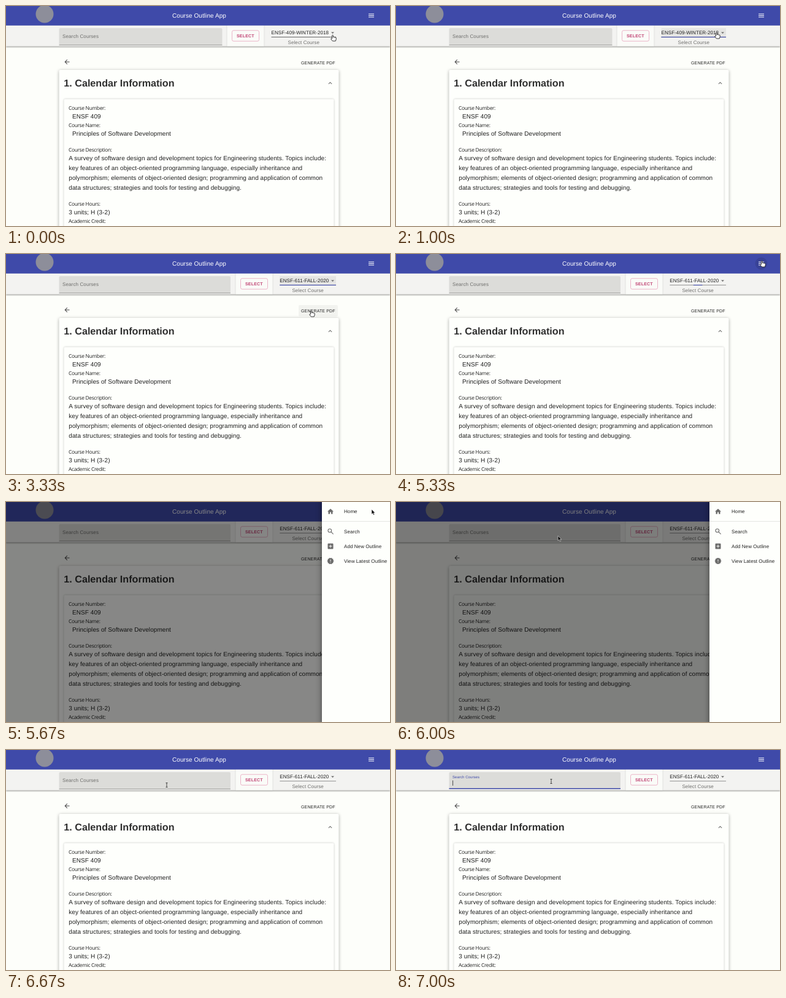
An HTML page for the animation above (8 s loop, 626 px wide and 358 px high).

```html
<!DOCTYPE html>
<html lang="en">
<head>
<meta charset="utf-8">
<title>Course Outline App</title>
<style>
  html, body { margin: 0; width: 100%; height: 100%; overflow: hidden; background: #fdfefa; }
  svg { display: block; width: 626px; height: 358px; }
  text { font-family: "Liberation Sans", Arial, sans-serif; fill: #212121; white-space: pre; text-rendering: geometricPrecision; }
  .body { font-size: 10px; letter-spacing: .075px; }
  .label { font: 500 8.4px "Open Sans", "Noto Sans", sans-serif; letter-spacing: -.32px; }
  .small { font-size: 8px; letter-spacing: .075px; }
  .button { font-size: 7px; letter-spacing: .15px; }
  .hint { fill: #6f6f6d; }
  .icon { fill: #6b6b6a; }
  .bar { filter: drop-shadow(0 1px 1.2px rgba(0,0,0,.45)); }
  .card { fill: #fefffc; filter: drop-shadow(0 1px 2.4px rgba(0,0,0,.34)); }
  .inner { fill: #fefffc; filter: drop-shadow(0 .5px 1.5px rgba(0,0,0,.24)); }
  .panel { filter: drop-shadow(0 .5px .8px rgba(0,0,0,.16)); }
  .popup { fill: #fefffc; filter: drop-shadow(0 2px 2.5px rgba(0,0,0,.4)); }
  .sheet { fill: #fefffc; filter: drop-shadow(-1px 0 4px rgba(0,0,0,.4)); }
</style>
</head>
<body>
<svg id="stage" viewBox="0 0 626 358" xmlns="http://www.w3.org/2000/svg"></svg>
<script>
const stage = document.getElementById("stage");
const LOOP = 8000;
const BLUE = "#3f4aa9";

const text = (x, y, cls, str, extra = "") =>
  `<text x="${x}" y="${y}" class="${cls}" ${extra}>${str}</text>`;
const rect = (x, y, w, h, fill, extra = "") =>
  `<rect x="${x}" y="${y}" width="${w}" height="${h}" fill="${fill}" ${extra}/>`;
// 24-unit icons drawn at half size, centred on x, y
const icon = (x, y, d, extra = 'class="icon"') =>
  `<path transform="translate(${x - 6} ${y - 6}) scale(.5)" d="${d}" ${extra}/>`;

const ICONS = {
  menu: "M3 18h18v-2H3zM3 13h18v-2H3zM3 6v2h18V6z",
  back: "M20 11H7.83l5.59-5.59L12 4l-8 8 8 8 1.41-1.41L7.83 13H20z",
  less: "M12 8l-6 6 1.41 1.41L12 10.83l4.59 4.58L18 14z",
  drop: "M7 10l5 5 5-5z",
  home: "M10 20v-6h4v6h5v-8h3L12 3 2 12h3v8z",
  add: "M19 3H5a2 2 0 0 0-2 2v14a2 2 0 0 0 2 2h14a2 2 0 0 0 2-2V5a2 2 0 0 0-2-2zm-2 10h-4v4h-2v-4H7v-2h4V7h2v4h4z",
  latest: "M23 12l-2.4-2.8.3-3.7-3.6-.8-1.9-3.2L12 3 8.6 1.5 6.7 4.7l-3.6.8.3 3.7L1 12l2.4 2.8-.3 3.7 3.6.8 1.9 3.2L12 21l3.4 1.5 1.9-3.2 3.6-.8-.3-3.7zm-10 5h-2v-2h2zm0-4h-2V7h2z"
};

const COURSES = ["ENSF-409-WINTER-2018", "ENSF-607-FALL-2020", "ENSF-619-FALL-2020", "ENSF-611-FALL-2020", "View All"];

const POINTERS = {
  hand: '<path d="M-2.4 1V-4.1Q-1.5-5.6-.6-4.1V-1.3Q.5-2 1.2-1.1 2.3-1.7 2.8-.8 4-1.2 4.2 0V2.2L3.2 5H-1.6L-4.3 1.6Q-4.2.2-2.4 1Z" fill="#fff" stroke="#222" stroke-width=".9" stroke-linejoin="round"/>',
  arrow: '<path d="M0 0V8L1.9 6.3 3.2 9.2 4.6 8.6 3.3 5.8H5.8Z" fill="#111" stroke="#fff" stroke-width=".5"/>',
  beam: '<path d="M-1.5-3.5H1.5M0-3.5V3.5M-1.5 3.5H1.5" fill="none" stroke="#333" stroke-width=".9"/>'
};

// Each step inherits whatever it does not set from the one before.
const STEPS = [
  { at: 0, ptr: "hand", x: 534, y: 52, course: 0, line: "#555", focus: 0, menu: 0, row: 0,
    pdf: 0, btn: 0, burger: 0, shade: 0, drawer: 120, typing: 0 },
  { at: 330, y: 51, line: "#333" },
  { at: 670, x: 525, y: 48 },
  { at: 1000, x: 524, focus: 1 },
  { at: 1330, x: 519, y: 46, menu: 1 },
  { at: 1670, x: 513, y: 84, row: 2 },
  { at: 2000, x: 502, y: 105, row: 3 },
  { at: 2330, x: 500, y: 97 },
  { at: 3000, course: 3, menu: .9, line: "#8b8b89" },
  { at: 3330, x: 499, menu: 0, pdf: .045 },
  { at: 3670, x: 484, y: 92 },
  { at: 4000, x: 388, y: 57, pdf: 0, btn: .04 },
  { at: 4330, x: 405, y: 54, btn: .08 },
  { at: 4670, ptr: "arrow", x: 552, y: 18, btn: .04 },
  { at: 5000, ptr: "hand", x: 597, y: 16, btn: 0, burger: .1 },
  { at: 5330, x: 598, focus: .16 },
  { at: 5670, ptr: "arrow", x: 596, y: 12, focus: 0, burger: 0, shade: .47, drawer: 4 },
  { at: 6000, x: 264, y: 55, shade: .5, drawer: 0 },
  { at: 6330, shade: .065, drawer: 75 },
  { at: 6670, ptr: "beam", x: 262, y: 57, shade: 0, drawer: 120 },
  { at: 7000, x: 253, y: 51, typing: 1 }
];
for (let i = 1; i < STEPS.length; i++) STEPS[i] = { ...STEPS[i - 1], ...STEPS[i] };

function page() {
  return rect(0, 0, 626, 358, "#fdfefa") +
    rect(86.5, 104, 456, 270, "", 'class="card" rx="2"') +
    rect(94.5, 151.5, 440, 220, "", 'class="inner" rx="2"') +
    icon(99.5, 91, ICONS.back, 'fill="#444"') +
    icon(528.5, 125.5, ICONS.less) +
    text(94.3, 131, "", "1. Calendar Information", 'font-size="16.15" font-weight="700" style="fill:#303030"') +
    text(102, 168.5, "label", "Course Number:") +
    text(108, 183, "body", "ENSF 409") +
    text(102, 196.5, "label", "Course Name:") +
    text(108, 211, "body", "Principles of Software Development") +
    text(102, 236.5, "label", "Course Description:") +
    [
      "A survey of software design and development topics for Engineering students. Topics include:",
      "key features of an object-oriented programming language, especially inheritance and",
      "polymorphism; elements of object-oriented design; programming and application of common",
      "data structures; strategies and tools for testing and debugging."
    ].map((s, i) => text(102.3, 251 + 16 * i, "body", s)).join("") +
    text(102, 324.5, "label", "Course Hours:") +
    text(102.3, 339, "body", "3 units; H (3-2)") +
    text(102, 352.5, "label", "Academic Credit:");
}

function appBar() {
  return rect(0, 0, 626, 31.75, BLUE) +
    '<circle cx="63" cy="13" r="14.5" fill="#8d8e9a"/>' +
    text(271, 19, "", "Course Outline App", 'font-size="10" letter-spacing=".07" style="fill:#fff"');
}

function search(s, right) {
  const w = right - 86.5;
  return rect(86.5, 36, w, 27.5, "#dcdcd9", 'rx="2"') +
    (s.typing
      ? rect(86.5, 62, w, 1.5, BLUE) +
        text(92, 45.6, "", "Search Courses", `font-size="6" letter-spacing=".07" style="fill:${BLUE}"`) +
        rect(92.3, 49.5, .8, 8.5, "#222")
      : rect(86.5, 63, w, .8, "#8b8b89") +
        text(92, 52, "small hint", "Search Courses", 'style="letter-spacing:.12px"'));
}

function selectButton(x, hover) {
  return rect(x - 7.5, 30, 60, 35.5, "#fafbf8", 'class="panel"') +
    rect(x + .5, 39.8, 44, 17.4, `rgba(245,0,87,${hover})`, 'rx="2.5" stroke="#e7a3bd" stroke-width=".8"') +
    text(x + 8, 51, "button", "SELECT", 'font-weight="700" style="fill:#c04272;letter-spacing:.2px"');
}

function picker(s, x) {
  const w = 538 - x;
  return (s.focus > .5 ? rect(x, 36, w, 15, "rgba(0,0,0,.06)") : "") +
    text(x, 46, "small", COURSES[s.course]) +
    icon(532.5, 43.5, ICONS.drop) +
    rect(x, 50.2, w, .9, s.line) +
    (s.focus ? rect(x + w * (1 - s.focus) / 2, 50, w * s.focus, 1.1, BLUE) : "") +
    text(x + w / 2, 62, "small hint", "Select Course", 'text-anchor="middle" style="letter-spacing:.1px"');
}

function menu(s) {
  if (!s.menu) return "";
  const row = (i, a) => rect(432.5, 34 + 18 * i, 110, 18, `rgba(0,0,0,${a})`);
  return `<g opacity="${s.menu}">` +
    rect(432.5, 30.5, 110, 98, "", 'class="popup" rx="2"') +
    row(s.course, .08) + (s.row !== s.course ? row(s.row, .04) : "") +
    COURSES.map((c, i) => text(440.5, 46 + 18 * i, "small", c)).join("") + "</g>";
}

function drawer(s) {
  if (!s.shade) return "";
  const items = [["Home", 15.5, "home"], ["Search", 47.8, ""], ["Add New Outline", 72, "add"], ["View Latest Outline", 96, "latest"]];
  const glass = '<g fill="none" stroke="#6b6b6a" stroke-width="1.1"><circle cx="523.8" cy="46.5" r="2.8"/><path d="M526 48.7L529.6 52.3"/></g>';
  return rect(0, 0, 626, 358, `rgba(0,0,0,${s.shade})`) +
    `<g transform="translate(${s.drawer} 0)">` +
    rect(511, -10, 130, 380, "", 'class="sheet"') +
    rect(511, 31, 120, .8, "#dfdfdd") +
    items.map(([name, y, key]) => text(547, y + 2.7, "small", name) +
      (key ? icon(525, y, ICONS[key]) : glass)).join("") + "</g>";
}

function draw(s) {
  const wide = s.course === 3;
  return page() +
    (s.pdf ? rect(477, 83, 64, 18.5, `rgba(0,0,0,${s.pdf})`, 'rx="2"') : "") +
    text(481, 95, "button", "GENERATE PDF") +
    rect(0, 30, 626, 35.6, "#f3f3f1", 'class="bar"') +
    search(s, wide ? 366 : 352.5) +
    selectButton(wide ? 382 : 368, s.btn) +
    picker(s, wide ? 446.3 : 432.5) +
    appBar() +
    (s.burger ? `<circle cx="595.5" cy="15.5" r="10" fill="rgba(0,0,0,${s.burger})"/>` : "") +
    icon(595.5, 15.5, ICONS.menu, 'fill="#fff"') +
    menu(s) + drawer(s) +
    `<g transform="translate(${s.x} ${s.y})">${POINTERS[s.ptr]}</g>`;
}

let shown = null;
function render(ms) {
  const t = ms % LOOP;
  const step = STEPS.filter(s => s.at <= t).pop();
  if (step !== shown) stage.innerHTML = draw(shown = step);
}

const start = performance.now();
function tick() {
  render(performance.now() - start);
  requestAnimationFrame(tick);
}
tick();
</script>
</body>
</html>
```
